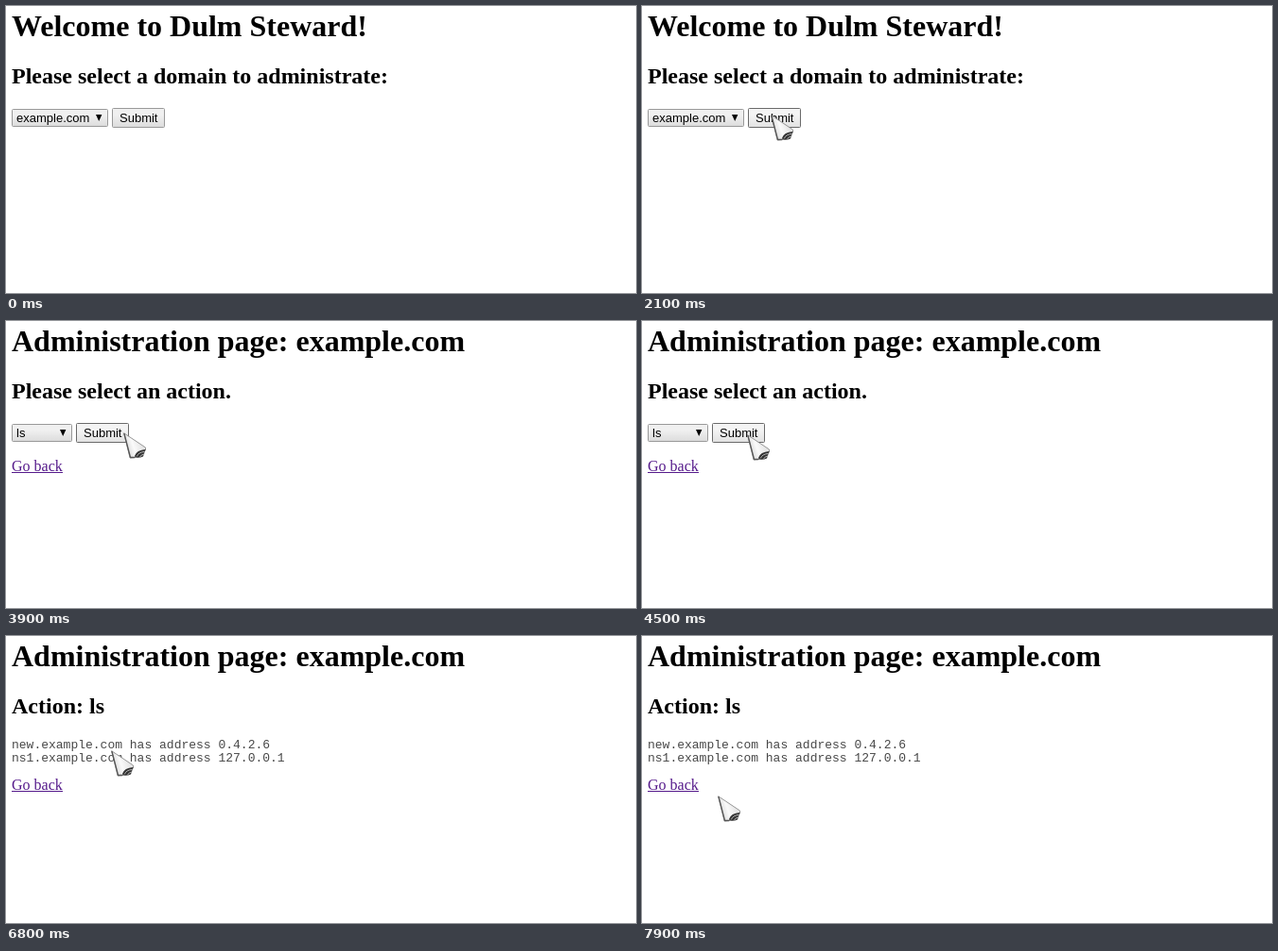
Write an HTML page that moves like this. It is 666 px wide and 304 px high and loops after 8000 ms.

```html
<!DOCTYPE html>
<html lang="en">
<head>
<meta charset="utf-8">
<title>Domain administration</title>
<style>
  html, body { margin: 0; width: 100%; height: 100%; overflow: hidden; background: #fff; }
  svg { display: block; width: 666px; height: 304px; }
  text { white-space: pre; }
  .h1, .h2 { font: bold 32px "Liberation Serif", "Times New Roman", serif; }
  .h2 { font-size: 24px; }
  .ui { font: 13px "Liberation Sans", Arial, sans-serif; }
  .pre { font: 13px "Liberation Mono", "Courier New", monospace; fill: #484848; }
  .link { font: 16px "Liberation Serif", "Times New Roman", serif; fill: #551a8b; }
  .box { fill: url(#face); stroke: #999; }
  .hover .box { fill: url(#lit); stroke: #6a6a6a; }
  .press .box { fill: url(#down); stroke: #6a6a6a; }
</style>
</head>
<body>
<svg viewBox="0 0 666 304">
  <defs>
    <linearGradient id="face" x2="0" y2="1">
      <stop offset=".35" stop-color="#f0f0f0"/><stop offset="1" stop-color="#dcdcdc"/>
    </linearGradient>
    <linearGradient id="lit" x2="0" y2="1">
      <stop offset=".35" stop-color="#f4f4f4"/><stop offset="1" stop-color="#e2e2e2"/>
    </linearGradient>
    <linearGradient id="down" x2="0" y2="1">
      <stop offset="0" stop-color="#d6d6d6"/><stop offset="1" stop-color="#e8e8e8"/>
    </linearGradient>
    <linearGradient id="metal" x1="0" y1=".6" x2=".8" y2=".3">
      <stop offset="0" stop-color="#d2d2d2"/><stop offset=".5" stop-color="#fafafa"/><stop offset="1" stop-color="#e4e4e4"/>
    </linearGradient>
  </defs>

  <g class="page">
    <text class="h1" x="6" y="32">Welcome to Dulm Steward!</text>
    <text class="h2" x="6" y="82">Please select a domain to administrate:</text>
    <g class="ui">
      <rect class="box" x="6.5" y="109.5" width="101" height="18" rx="1"/>
      <text x="11" y="123">example.com</text>
      <path d="M95 115h6.400l-3.200 7z"/>
    </g>
    <g class="ui button">
      <rect class="box" x="112.500" y="108.500" width="55" height="20" rx="1"/>
      <text x="120" y="123">Submit</text>
    </g>
  </g>

  <g class="page">
    <text class="h1" x="6" y="32">Administration page: example.com</text>
    <text class="h2" x="6" y="82">Please select an action.</text>
    <g class="ui">
      <rect class="box" x="6.500" y="109.500" width="63" height="18" rx="1"/>
      <text x="11" y="123">ls</text>
      <path d="M57 115h6.400l-3.200 7z"/>
    </g>
    <g class="ui button">
      <rect class="box" x="74.500" y="108.500" width="55" height="20" rx="1"/>
      <text x="82" y="123">Submit</text>
    </g>
    <text class="link" x="6" y="159">Go back</text>
    <path d="M6 160h54v1H6z" fill="#551a8b"/>
  </g>

  <g class="page">
    <text class="h1" x="6" y="32">Administration page: example.com</text>
    <text class="h2" x="6" y="82">Action: ls</text>
    <text class="pre" x="6" y="119">new.example.com has address 0.4.2.6</text>
    <text class="pre" x="6" y="133">ns1.example.com has address 127.0.0.1</text>
    <text class="link" x="6" y="163">Go back</text>
    <path d="M6 164h54v1H6z" fill="#551a8b"/>
  </g>

  <g id="cursor" stroke-linejoin="round" stroke-linecap="round" fill="none">
    <path d="M0 0L22.500 15V18Q14 18 11.500 25.500L6.500 26Z" fill="url(#metal)" stroke="#8c8c8c" stroke-width=".9"/>
    <path d="M0 .5L6.500 25.500H11" stroke="#555" stroke-width="1.300"/>
    <path d="M11 24Q13 17.500 22.500 17L20 24.500Q16 26.500 12 25.500Z" fill="#333"/>
    <path d="M13.500 24Q15 20 21 19.500M16.500 25Q17.500 22.500 21 22" stroke="#c4c4c4" stroke-width=".9"/>
  </g>
</svg>
<script>
  const LOOP = 8000, STEP = 100;
  const cursor = document.getElementById('cursor');
  const pages = [...document.querySelectorAll('.page')];
  const buttons = [...document.querySelectorAll('.button')];
  const buttonX = [112, 74];

  const linear = p => p;
  const easeOut = p => 1 - (1 - p) ** 2;
  const smooth = p => p * p * (3 - 2 * p);

  // time, x, y, easing towards that point
  const path = [
    [500, 538, 290], [1100, 152, 131, easeOut], [1300, 141, 120], [1500, 137, 116],
    [3600, 137, 116], [4200, 113, 121, smooth], [4400, 113, 121], [4500, 112, 121],
    [6700, 112, 121], [6800, 112, 122], [7400, 137, 211, smooth],
    [7700, 137, 211], [7900, 81, 170], [LOOP, 81, 170]
  ];

  function position(t) {
    const i = Math.max(1, path.findIndex(k => k[0] > t));
    const [t0, x0, y0] = path[i - 1];
    const [t1, x1, y1, ease = linear] = path[i];
    const p = ease((t - t0) / (t1 - t0));
    return [Math.round(x0 + (x1 - x0) * p), Math.round(y0 + (y1 - y0) * p)];
  }

  function draw(time) {
    const t = Math.floor(time % LOOP / STEP) * STEP;
    const page = t < 2900 ? 0 : t < 5700 ? 1 : 2;
    const shown = t >= 500;
    const [x, y] = shown ? position(t) : [0, 0];

    pages.forEach((g, i) => g.style.display = i === page ? '' : 'none');
    buttons.forEach((b, i) => {
      const over = shown && x >= buttonX[i] && x < buttonX[i] + 56 && y >= 108 && y < 129;
      b.classList.toggle('hover', over);
      b.classList.toggle('press', t === 2000 || t === 5100);
    });
    cursor.style.display = shown ? '' : 'none';
    cursor.setAttribute('transform', `translate(${x} ${y})`);
  }

  const start = performance.now();
  function tick() {
    draw(performance.now() - start);
    requestAnimationFrame(tick);
  }
  tick();
</script>
</body>
</html>
```
